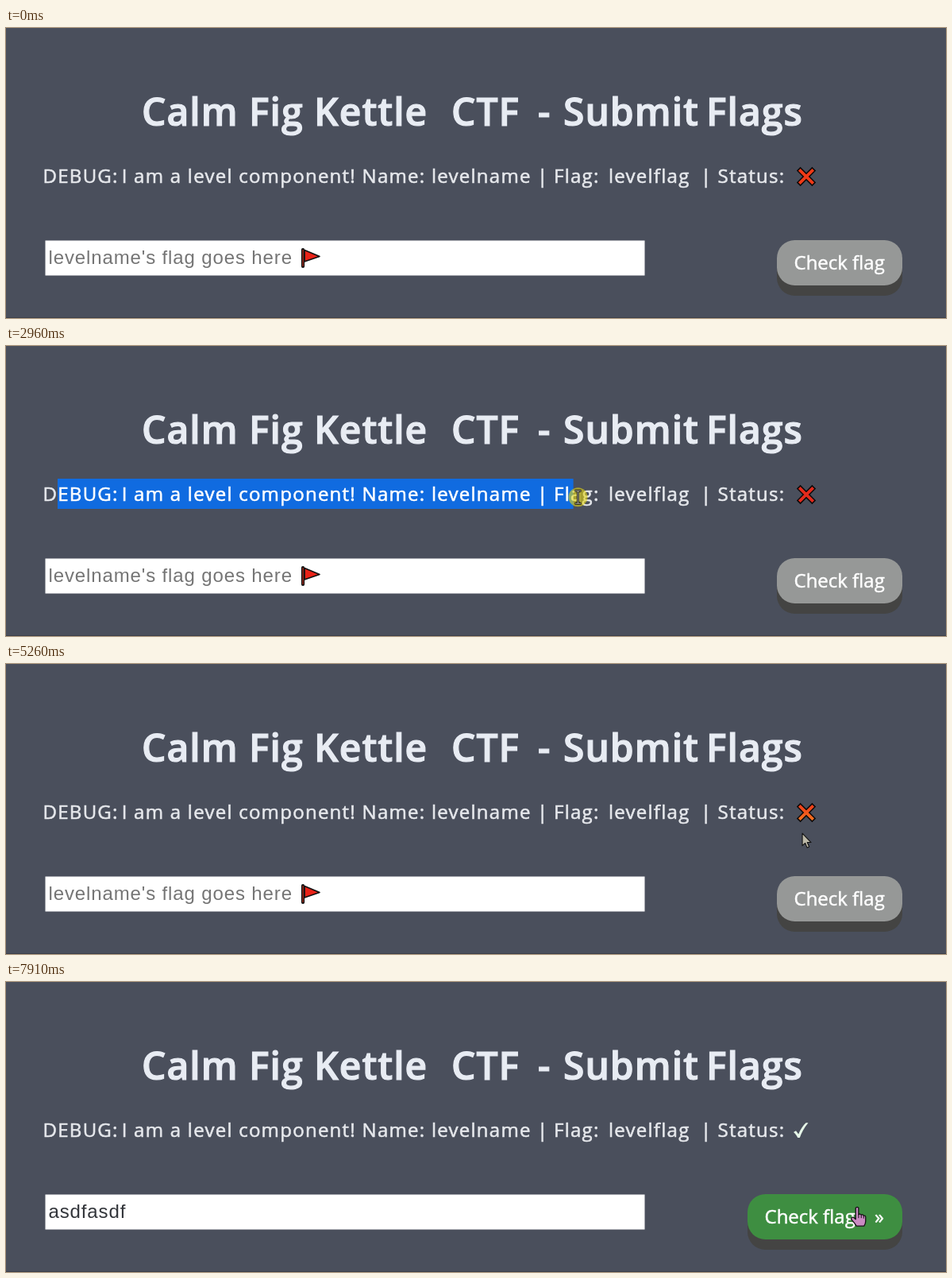
Write an HTML page that moves like this. It is 1184 px wide and 365 px high and loops after 8 s.

```html
<!DOCTYPE html>
<html lang="en">
<head>
<meta charset="utf-8">
<title>Submit Flags</title>
<style>
  html, body { margin: 0; width: 100%; height: 100%; overflow: hidden; background: #4a4f5c; }
  svg { display: block; width: 1184px; height: 365px; }
  text { white-space: pre; font: 400 24px "Open Sans", "Noto Sans", sans-serif; }
  .title { fill: #e8ecf3; stroke: #e8ecf3; stroke-width: 1.2; }
  .title text { font-size: 48px; font-weight: 600; letter-spacing: 1px; }
  .row { fill: #e6e8ec; stroke: #e6e8ec; stroke-width: .6; }
  .row text { letter-spacing: 1.25px; }
  .picked { fill: #fff; stroke: #fff; }
  .button { fill: #fff; stroke: #fff; stroke-width: .5; }
  .field { font-family: "Liberation Sans", Arial, sans-serif; letter-spacing: .87px; }
</style>
</head>
<body>
<svg viewBox="0 0 1184 365">
  <defs>
    <clipPath id="pickClip"><rect id="pickArea" x="65" y="167" height="38"/></clipPath>
    <linearGradient id="ember" x1="0" y1="0" x2="0" y2="1">
      <stop offset="0" stop-color="#f03e1a"/>
      <stop offset="1" stop-color="#f2701f"/>
    </linearGradient>
  </defs>

  <rect width="1184" height="365" fill="#4a4f5c"/>
  <rect y="364" width="1184" height="1" fill="#3b3f49"/>
  <g id="title" class="title"></g>

  <g id="row" class="row"></g>
  <rect id="pick" x="65" y="167" height="38" fill="#106be0"/>
  <g clip-path="url(#pickClip)"><g id="rowPicked" class="row picked"></g></g>

  <g id="cross" transform="translate(1008 187)" fill="none">
    <path d="M-9.8-9.8 9.8 9.8M9.8-9.8-9.8 9.8" stroke="#0c0a0a" stroke-width="6.8"/>
    <path id="crossInk" d="M-8.7-8.7 8.7 8.7M8.7-8.7-8.7 8.7" stroke-width="3.8"/>
  </g>
  <path id="tick" d="M992 189L995 187.2 998.2 191.6C1000.5 185.5 1004 180.5 1007.5 177.2H1010.5C1005.5 183 1002 189.5 999.8 196H997.2C996 193.3 994.2 190.8 992 189Z" fill="#e6f6e8"/>

  <rect x="49.5" y="267.5" width="755" height="44" fill="#fff"/>
  <g id="hint">
    <text class="field" x="53.5" y="297" fill="#757575">levelname's flag goes here</text>
    <path d="M376 279.5L395 287.5 376 294Z" fill="#ea2318" stroke="#111" stroke-width="1.6" stroke-linejoin="round"/>
    <path d="M374 279V300" stroke="#111" stroke-width="4.2" stroke-linecap="round"/>
    <path d="M374 279V300" stroke="#b8301f" stroke-width="1.3"/>
  </g>
  <text id="value" class="field" x="53.5" y="297" fill="#33363b"></text>
  <rect id="caret" y="277" width="1.2" height="25" fill="#222"/>
  <g fill="#4caf50">
    <rect id="top" x="49" y="267" height="3"/>
    <rect id="left" x="49" y="267" width="3"/>
    <rect id="bottom" y="309" height="3"/>
    <rect id="right" x="802" width="3"/>
  </g>

  <rect id="shade" y="280" height="57" rx="22.5" fill="#444443"/>
  <g id="face">
    <rect id="cap" y="267" height="57" rx="22.5"/>
    <text id="label" class="button" y="304">Check flag</text>
    <text id="more" class="button" y="304">»</text>
  </g>

  <circle id="halo" r="12" fill="#e6d714" fill-opacity=".6"/>
  <path id="arrow" d="M0 0V15.5L3.6 12.3 6 18 8.6 16.9 6.2 11.4H11Z" fill="#bdb9a8" stroke="#111" stroke-width="1.1" stroke-linejoin="round"/>
  <g id="beam" fill="none">
    <path d="M-4-8H4M0-8V8M-4 8H4" stroke="#111" stroke-width="3"/>
    <path id="beamInk" d="M-3.5-8H3.5M0-8V8M-3.5 8H3.5" stroke-width="1.1"/>
  </g>
  <g id="hand" stroke="#151015">
    <path d="M-2-1Q0-2.6 1.6-1V7.5Q3.6 6 5 8Q7 6.8 8 9Q10.5 8.4 10.5 11V16Q10.5 19 8.5 22H-1Q-3.5 18-7.6 13.5Q-7.6 10.5-4.6 11.2L-2 13.5Z" fill="#c98bc2" stroke-width="1.3" stroke-linejoin="round"/>
    <path d="M1.6 7.5V12M5 8V12M8 9V12.5"/>
  </g>
</svg>
<script>
const LOOP = 8000;
const PICK_START = 2040, PICK_END = 4350;
const FOCUS = 5790, TYPE = 6060, HOVER = 7270, PRESS = 7420, SOLVED = 7540;
const WORD = "asdfasdf";

const $ = id => document.getElementById(id);
const set = (id, attrs) => {
  for (const key in attrs) $(id).setAttribute(key, attrs[key]);
};
const show = (id, on) => $(id).style.display = on ? "" : "none";
const clamp = v => Math.min(1, Math.max(0, v));
const mix = (a, b, p) => a + (b - a) * p;
const within = (t, from, to) => t >= from && t < to;

function write(id, y, phrases) {
  for (const phrase in phrases) {
    const el = document.createElementNS("http://www.w3.org/2000/svg", "text");
    el.textContent = phrase;
    el.setAttribute("x", phrases[phrase]);
    el.setAttribute("y", y);
    $(id).append(el);
  }
}
write("title", 123, { "Calm Fig Kettle": 171, "CTF": 561, "-": 670, "Submit": 702, "Flags": 882 });
for (const id of ["row", "rowPicked"]) {
  write(id, 195, {
    "DEBUG:": 46.5, "I am a level component!": 145.7, "Name: levelname": 448.6,
    "|            |": 669, "Flag:": 690, "levelflag": 759, "Status:": 896.5
  });
}
// The second divider sits a fixed step after the first
for (const id of ["row", "rowPicked"]) {
  const bars = [...$(id).children].find(el => el.textContent.startsWith("|"));
  bars.textContent = "||";
  bars.setAttribute("x", "669 875");
}

// Key points of the pointer: time, x, y
const PATH = [
  [380, 760, 366], [1170, 231, 204], [1300, 203, 201], [1940, 65, 190],
  [PICK_START, 65, 190], [2370, 327, 207], [2830, 672, 192], [3700, 994, 180],
  [4500, 996, 186], [5260, 1004, 213], [5390, 880, 232], [5600, 620, 318],
  [FOCUS, 538, 287], [6400, 538, 287], [7070, 785, 264], [7400, 1068, 286],
  [LOOP, 1073, 285]
];

function pointer(t) {
  const i = PATH.findIndex(step => step[0] > t);
  if (i === 0) return [760, 400];
  const [t0, x0, y0] = PATH[i - 1], [t1, x1, y1] = PATH[i];
  const p = (t - t0) / (t1 - t0);
  return [mix(x0, x1, p), mix(y0, y1, p)];
}

function drawPointer(t, x, y) {
  const inRow = within(x, 49, 1026) && within(y, 167, 199);
  const inField = within(x, 50, 804) && within(y, 268, 311);
  const kind = t >= HOVER ? "hand" : inRow || inField ? "beam" : "arrow";
  for (const id of ["arrow", "beam", "hand"]) show(id, id === kind);
  set(kind, { transform: `translate(${x} ${y})` });
  set("beamInk", { stroke: inField ? "#111" : "#b9b59c" });
  const click = [PICK_END, FOCUS, PRESS].some(from => within(t, from, from + 110));
  show("halo", click || within(t, PICK_START, 3850));
  set("halo", { cx: x, cy: y });
}

function drawRow(t, x, y) {
  const on = within(t, PICK_START, PICK_END);
  const letter = 12.03;
  const upTo = Math.min(77, Math.round((x - 65) / letter)) * letter;
  const width = on ? (y > 199 ? 961 : Math.max(0, upTo)) : 0;
  set("pick", { width });
  set("pickArea", { width });
  set("crossInk", { stroke: on ? "#e32a1c" : t < PICK_END ? "#f03a17" : "url(#ember)" });
  show("cross", t < SOLVED);
  show("tick", t >= SOLVED);
}

// Letters come in bursts of four
const keyTime = i => TYPE + 55 * i + 80 * Math.floor(i / 4);

function drawField(t) {
  const typed = [...WORD].filter((_, i) => keyTime(i) <= t).length;
  show("hint", typed === 0);
  $("value").textContent = WORD.slice(0, typed);
  const last = typed ? keyTime(typed - 1) : FOCUS;
  show("caret", within(t, FOCUS, PRESS) && (t - last) % 1060 < 530);
  set("caret", { x: 54.5 + (typed ? $("value").getComputedTextLength() : 0) });

  const grow = 1 - (1 - clamp((t - FOCUS) / 400)) ** 2;
  const fade = (1 - clamp((t - PRESS) / 450)) ** 2;
  const p = grow * fade;
  const w = 756 * p, h = 45 * p ** 3;
  set("top", { width: w });
  set("bottom", { x: 805 - w, width: w });
  set("left", { height: h });
  set("right", { y: 312 - h, height: h });
}

function drawButton(t) {
  const u = clamp((t - HOVER) / 500);
  const p = u * u * (3 - 2 * u);
  const x = 971 - 37 * p, width = 1129 - x;
  const rgb = [mix(150, 62, p), mix(152, 142, p), mix(151, 65, p)].map(Math.round);
  set("shade", { x, width });
  set("cap", { x, width, fill: `rgb(${rgb})` });
  set("label", { x: x + 21.5 });
  set("more", { x: 1094 + 20 * (1 - p), opacity: p });
  set("face", { transform: `translate(0 ${within(t, PRESS, SOLVED) ? 6 : 0})` });
}

function draw(t) {
  const [x, y] = pointer(t);
  drawRow(t, x, y);
  drawField(t);
  drawButton(t);
  drawPointer(t, x, y);
}

const start = performance.now();
function frame() {
  draw((performance.now() - start) % LOOP);
  requestAnimationFrame(frame);
}
frame();
</script>
</body>
</html>
```
